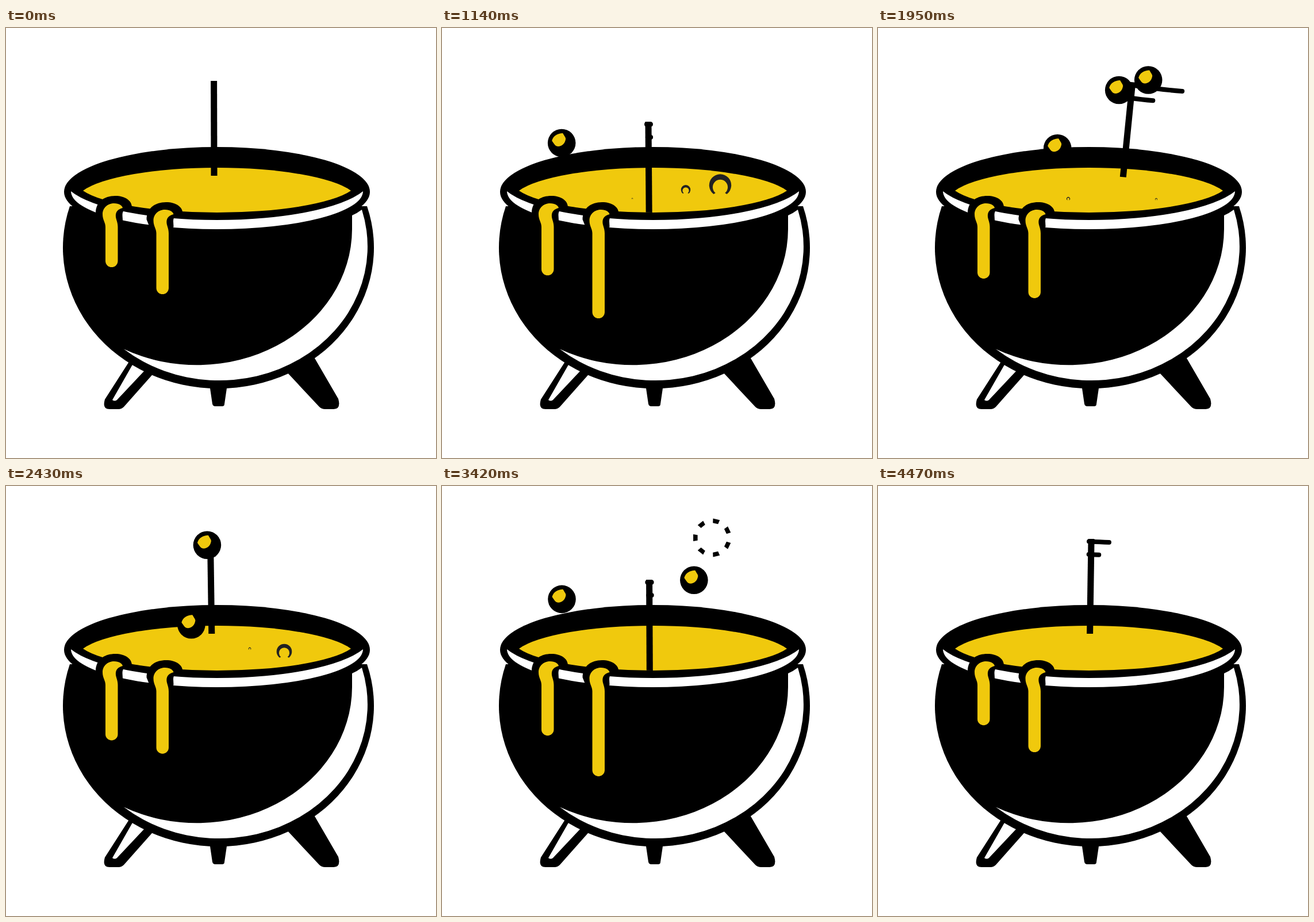
These frames come from a looping animation (748x748 px, 4.5 s). An HTML page:

```html
<!DOCTYPE html>
<html lang="en">
<head>
<meta charset="utf-8">
<title>Cauldron</title>
<style>
html,body{margin:0;width:100%;height:100%;overflow:hidden;background:#fff}
svg{display:block;width:100%;height:100%}
</style>
</head>
<body>
<svg viewBox="0 0 748 748">
  <defs>
    <clipPath id="above"><path d="M0 0H748V283H600A245 55 0 0 1 134 283H0Z"/></clipPath>
  </defs>
  <!-- legs -->
  <path d="M488 598L535 571L578 645Q583 663 570 663H555Q549 663 545 659Z"/>
  <path d="M215 579L172 646Q167 663 180 663H196Q201 663 205 659L259 598Z"/>
  <path d="M221 584L241 596L193 647Q189 650 185 647Z" fill="#fff"/>
  <path d="M354 620L359 654Q360 658 364 658H376Q380 658 380 654L385 620Z"/>
  <!-- bowl and rim -->
  <path d="M111 310A270.5 245 0 1 0 628 310Z"/>
  <path d="M205 558.5A270 237 0 0 0 602 350V326Q611 322 619 316A258 233 0 0 1 205 558.5Z" fill="#fff"/>
  <path d="M101 285A266 78 0 0 1 633 285A266 77 0 0 1 101 285Z"/>
  <path d="M113 284A254 66 0 0 0 621 284A268 73.4 0 0 1 113 284Z" fill="#fff"/>
  <path d="M134 283A245 57.9 0 0 1 600 283A245 55 0 0 1 134 283Z" fill="#f0c90d"/>
  <g clip-path="url(#above)" fill="none" stroke="#000">
    <path id="stem" stroke-width="11"/>
    <path id="bit" stroke-width="8" stroke-linecap="round"/>
  </g>
  <g id="drips"></g>
  <g id="bubbles"></g>
</svg>
<script>
const NS = 'http://www.w3.org/2000/svg';
const LOOP = 4500, LAP = LOOP / 2, STEP = 30, YELLOW = '#f0c90d';
const { PI, sin, cos, exp, abs, min, max, sign } = Math;
const $ = id => document.getElementById(id);
const set = (el, attrs) => { for (const k in attrs) el.setAttribute(k, attrs[k]); return el; };
const add = (parent, tag, attrs = {}) => parent.appendChild(set(document.createElementNS(NS, tag), attrs));
const wave = (t, period) => (1 - cos(2 * PI * t / period)) / 2;

// --- stirring key: rests at the back and front, sweeps round each side ---
const sweep = (t, mid) => 1 / (1 + exp((mid - t) / 80));
const swing = s => Math.pow(sin(PI * s), 0.75);

// the teeth trail behind the motion: [time in lap, reach]
const TURN = [[0, 0], [200, 14], [700, -78], [1140, -3], [1620, -33], [1860, 95], [LAP, 30]];
function reachAt(p) {
  const i = TURN.findIndex(([time]) => p < time);
  const [t0, a] = TURN[i - 1], [t1, b] = TURN[i];
  return a + (b - a) * wave(p - t0, 2 * (t1 - t0));
}

function drawKey(t) {
  const p = t % LAP, left = sweep(p, 640), right = sweep(p, 1785);
  const dx = 140 * swing(right) - 165 * swing(left);
  const x = 363 + dx, y = 292.5 - 35.5 * cos(PI * (left + right));
  const lean = 18 * Math.tanh(dx / 40), top = y - 165;
  const reach = reachAt(p);
  const tooth = (drop, len) => {
    const tx = x + lean * (1 - drop / 165), ty = top + drop;
    const dy = len * abs(reach) * 0.0015;
    return `M${tx - sign(len) * 4} ${ty}Q${tx + len / 2} ${ty + dy * 0.7} ${tx + len} ${ty + dy}`;
  };
  set($('stem'), { d: `M${x} ${y}L${x + lean} ${top}` });
  set($('bit'), { d: abs(reach) > 2 ? tooth(4.5, reach) + tooth(27, reach * 0.44) : '' });
}

// --- drips ---
function makeDrip(dx, dy, low, amp, period) {
  const g = add($('drips'), 'g', { transform: `translate(${dx} ${dy})` });
  add(g, 'path', { d: 'M156 322C156 303 170 292 190 292C207 292 219 300 219 312L205 317C201 322 203 328 203 335L195 346H173L160 332Z' });
  return { el: add(g, 'path', { fill: YELLOW }), low, amp, period };
}
const drips = [makeDrip(0, 0, 405.3, 30.5, LOOP / 3), makeDrip(88.5, 11, 441.3, 42, LAP)];

function drawDrip({ el, low, amp, period }, t) {
  const y = low + amp * wave(t, period);
  set(el, { d: `M168 324C168 312 178 305 188 305C197 305 202 309 203 313C196 315 192 318 191 324C190 332 194.5 336 194.5 346V${y}A10.7 10.7 0 0 1 173 ${y}V346C173 338 168 334 168 324Z` });
}

// --- bubbles ---
const RISE = 0.222, SURFACE = 257, POP = 200, SWELL = 600, FADE = 50;

// each vent: place, depth, side it drifts to, then [surfacing time, burst height] pairs
const vents = [
  { x: 227, depth: 269, side: -1, runs: [[853, 125], [3119, 61]] },
  { x: 331, depth: 297, side: -1, runs: [[1705, 64], [2329, 79]] },
  { x: 424, depth: 283, side: 1, runs: [[1249, 79], [2970, 78]] },
  { x: 484, depth: 298, side: 1, runs: [[1170, 79], [2495, 90]] }
];

function makeBubble(vent, born, end) {
  const g = add($('bubbles'), 'g');
  const ring = add(g, 'path', {
    d: 'M-.43 .7L-.6 .8A1 1 0 1 1 .6 .8L.43 .7A.68 .68 0 1 0 -.43 .7Z', fill: '#222'
  });
  const ball = add(g, 'g');
  add(ball, 'circle', { r: 24.3 });
  add(ball, 'path', {
    d: 'M-17-4C-15-12-7-17 2-17C4-13 7-10 7-7C6 1 0 6-6 6C-11 6-13 2-17-4Z', fill: YELLOW
  });
  return { ...vent, born, end, ring, ball, pop: add(g, 'path') };
}
const bubbles = vents.flatMap(v => v.runs.map(([born, end]) => makeBubble(v, born, end)));

function sway(side, h) {
  return side < 0 ? -19 * sin(2 * PI * h / 210) : -16 * sin(2 * PI * h / 150 + 0.35) * min(1, h / 40);
}

function rays(inner, outer) {
  const at = (r, a) => `${r * cos(a)} ${r * sin(a)}`;
  let d = '';
  for (let i = 0; i < 7; i++) {
    const a = PI + i * 2 * PI / 7, w = 0.18;
    d += `M${at(inner, a - w)}L${at(outer, a - w)}L${at(outer, a + w)}L${at(inner, a + w)}Z`;
  }
  return d;
}

function drawBubble({ x, depth, side, born, end, ring, ball, pop }, t) {
  const age = t - born, climb = (SURFACE - end) / RISE;
  const h = max(0, age - STEP) * RISE;
  const burst = (age - STEP - climb) / POP;
  const show = (el, on, attrs) => set(el, on ? { display: 'inline', ...attrs() } : { display: 'none' });

  show(ring, age > -SWELL && age < FADE, () => {
    const grow = exp(-Math.pow(max(0, -age) / 85, 1.3));
    const r = (3 + 21 * grow) * min(1, (age + SWELL) / 80);
    return {
      transform: `translate(${x} ${depth + (SURFACE - depth) * grow * grow}) scale(${r})`,
      opacity: min(1, 1 - age / FADE)
    };
  });
  show(ball, age >= 0 && burst < 0, () => ({
    transform: `translate(${x + sway(side, h)} ${SURFACE - h})`,
    opacity: min(1, age / FADE)
  }));
  show(pop, burst >= 0 && burst < 1, () => ({
    transform: `translate(${x + sway(side, SURFACE - end)} ${end})`,
    d: rays(8 + 25 * burst, min(33.5, 24 + 25 * burst))
  }));
}

function draw(now) {
  const t = Math.floor((now % LOOP) / STEP) * STEP;
  drawKey(t);
  drips.forEach(d => drawDrip(d, t));
  bubbles.forEach(b => drawBubble(b, t));
}

let start = null;
function tick(now) {
  if (start === null) start = now;
  draw(max(0, now - start));
  requestAnimationFrame(tick);
}
draw(0);
requestAnimationFrame(tick);
</script>
</body>
</html>
```
